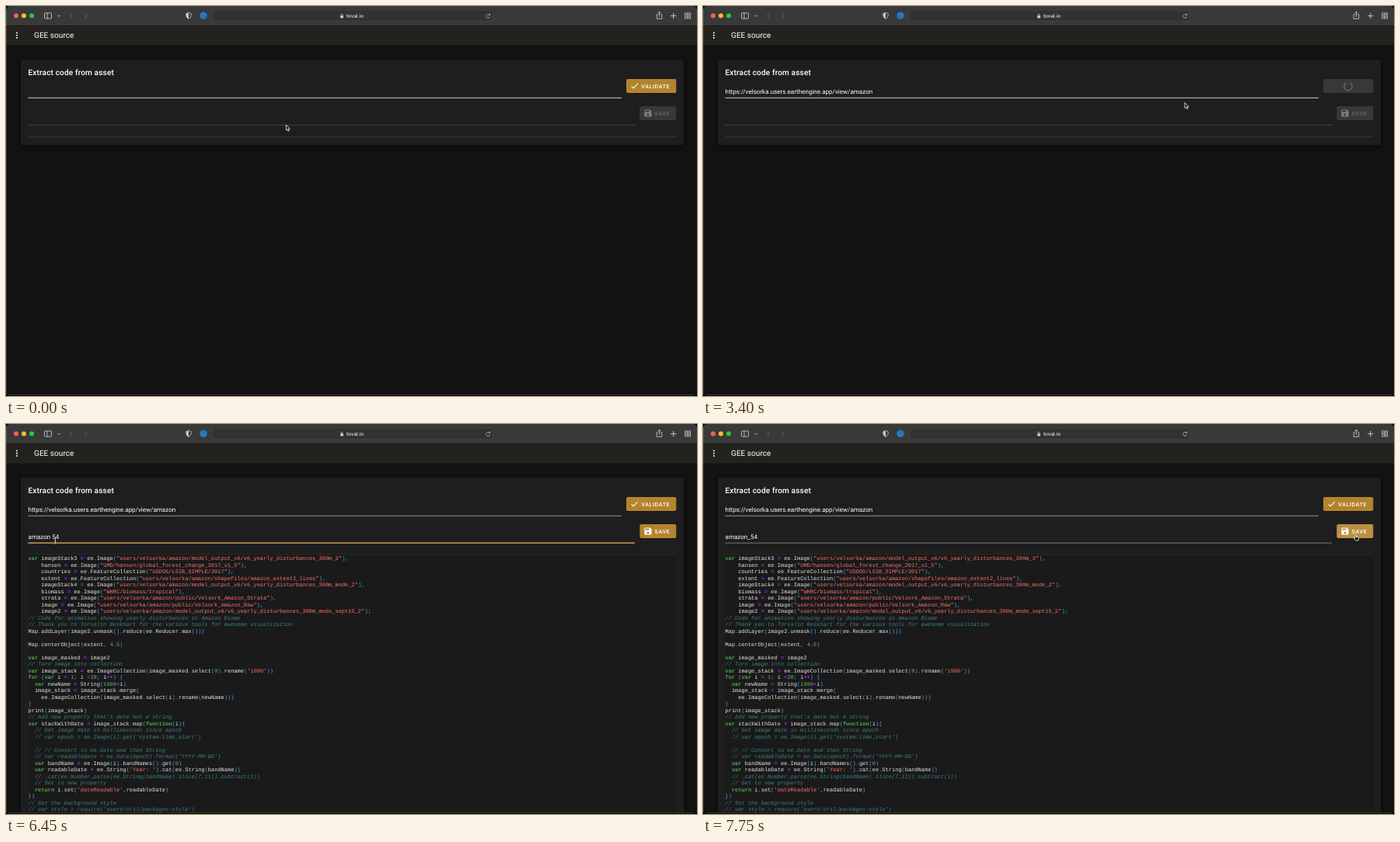
Animation of 889x502 px, one loop 8000 ms. Source, as an HTML page with a canvas:

```html
<!DOCTYPE html>
<html lang="en">
<head>
<meta charset="utf-8">
<title>GEE source</title>
<style>
html, body { margin: 0; width: 100%; height: 100%; overflow: hidden; background: #121212; }
canvas { display: block; width: 889px; height: 502px; }
</style>
</head>
<body>
<canvas id="stage"></canvas>
<script>
const W = 889, H = 502, LOOP = 8000;
const canvas = document.getElementById('stage');
const c = canvas.getContext('2d');
const dpr = window.devicePixelRatio || 1;
canvas.width = W * dpr;
canvas.height = H * dpr;

const ROBOTO = 'Roboto, sans-serif', UI = 'Inter, sans-serif';
const MONO = '"Liberation Mono", monospace';
const PRIMARY = '#b3842e', FOCUS = '#c48d3c';
const URL_TEXT = 'https://velsorka.users.earthengine.app/view/amazon';
const PAGE_URL = 'https://toval.io/api/sandbox/jupyter/voila/render/modules/GEE_source/ui.ipynb';

// Moments of the story, in ms
const T = { focus1: 600, paste: 1200, submit: 2300, loaded: 3700, focus2: 4450, type: 4950, open: 6830, close: 7220 };

const CODE = `var imageStack3 = ee.Image("users/velsorka/amazon/model_output_v6/v6_yearly_disturbances_300m_3"),
    hansen = ee.Image("UMD/hansen/global_forest_change_2017_v1_5"),
    countries = ee.FeatureCollection("USDOS/LSIB_SIMPLE/2017"),
    extent = ee.FeatureCollection("users/velsorka/amazon/shapefiles/amazon_extent2_lines"),
    imageStack4 = ee.Image("users/velsorka/amazon/model_output_v6/v6_yearly_disturbances_300m_mode_2"),
    biomass = ee.Image("WHRC/biomass/tropical"),
    strata = ee.Image("users/velsorka/amazon/public/Velsork_Amazon_Strata"),
    image = ee.Image("users/velsorka/amazon/public/Velsork_Amazon_Raw"),
    image2 = ee.Image("users/velsorka/amazon/model_output_v6/v6_yearly_disturbances_300m_mode_sept15_2");
// Code for animation showing yearly disturbances in Amazon Biome
// Thank you to Torvalin Beskhart for the various tools for awesome visualization
Map.addLayer(image2.unmask().reduce(ee.Reducer.max()))

Map.centerObject(extent, 4.5)

var image_masked = image2
// Turn image into collection
var image_stack = ee.ImageCollection(image_masked.select(0).rename('1990'))
for (var i = 1; i <28; i++) {
  var newName = String(1990+i)
  image_stack = image_stack.merge(
    ee.ImageCollection(image_masked.select(i).rename(newName)))
}
print(image_stack)
// Add new property that's date but a string
var stackWithDate = image_stack.map(function(i){
  // Get image date in milliseconds since epoch
  // var epoch = ee.Image(i).get('system:time_start')

  // // Convert to ee.Date and then String
  // var readableDate = ee.Date(epoch).format('YYYY-MM-DD')
  var bandName = ee.Image(i).bandNames().get(0)
  var readableDate = ee.String('Year: ').cat(ee.String(bandName))
  // .cat(ee.Number.parse(ee.String(bandName).slice(7,11)).subtract(1))
  // Set to new property
  return i.set('dateReadable',readableDate)
})
// Set the background style
// var style = require('users/oril/packages:style')`.split('\n');

const TOKEN = /\/\/.*|"[^"]*"|'[^']*'|\d[\d.]*|\w+|[=<+]+|[(){}.,;]+/g;

function tokenStyle(s) {
  if (s.startsWith('//')) return ['#408080', 'italic '];
  if (/^["']/.test(s)) return ['#ff7070', ''];
  if (/^(var|for|function|return)$/.test(s)) return ['#4caf50', 'bold '];
  if (/^\d/.test(s)) return ['#66bb6a', ''];
  if (/^[=<+]/.test(s)) return ['#aa22ff', 'bold '];
  if (/^\w/.test(s)) return ['#e6e6e6', ''];
  return ['#42a5f5', ''];
}

const clamp = v => Math.max(0, Math.min(1, v));
const ramp = (t, from, ms) => clamp((t - from) / ms);

function box(x, y, w, h, r, fill) {
  c.beginPath();
  c.roundRect(x, y, w, h, r);
  c.fillStyle = fill;
  c.fill();
}

function disc(x, y, r, fill) {
  c.beginPath();
  c.arc(x, y, r, 0, Math.PI * 2);
  c.fillStyle = fill;
  c.fill();
}

function path(d, x, y, scale, stroke, width, fill) {
  const p = new Path2D(d);
  c.save();
  c.translate(x, y);
  c.scale(scale, scale);
  if (fill) { c.fillStyle = fill; c.fill(p, 'evenodd'); }
  if (stroke) { c.strokeStyle = stroke; c.lineWidth = width; c.stroke(p); }
  c.restore();
}

function text(s, x, y, font, fill, align = 'left', spacing = 0) {
  c.font = font;
  c.fillStyle = fill;
  c.textAlign = align;
  c.letterSpacing = spacing + 'px';
  c.fillText(s, x, y);
  c.letterSpacing = '0px';
}

function toolbar(opened) {
  box(0, 0, W, 25, [5, 5, 0, 0], '#393939');
  box(0, 25, W, 1, 0, '#161616');
  ['#fe5f57', '#febc2e', '#28c840'].forEach((col, i) => disc(13 + i * 10, 12.5, 3, col));
  const line = (d, col = '#c4c4c4', w = 0.9) => path(d, 0, 0, 1, col, w);
  line('M50.5 9h7a1 1 0 0 1 1 1v5.2a1 1 0 0 1-1 1h-7a1 1 0 0 1-1-1v-5.2a1 1 0 0 1 1-1zM53 9v7');
  line('M66.3 11.8l1.7 1.7 1.7-1.7');
  line('M86 9.2l-3.2 3.4 3.2 3.4M101 9.2l3.2 3.4-3.2 3.4', '#686868', 1);
  path('M235 8.5l3.2 1.2v2.6q0 2.6-3.2 4.2-3.2-1.6-3.2-4.2v-2.6z', 0, 0, 1, '#c4c4c4', 0.8);
  path('M235 8.5v8q-3.2-1.6-3.2-4.2v-2.6z', 0, 0, 1, null, 0, '#c4c4c4');
  disc(254, 12.4, 4.7, '#2378c4');
  line('M838.8 10.8h-1.6v5.6h6.6v-5.6h-1.6M840.5 14v-6.6M838.6 9.2l1.9-1.9 1.9 1.9');
  line('M858.7 9v7.4M855 12.7h7.4', '#c4c4c4', 1);
  for (let i = 0; i < 4; i++) {
    c.strokeStyle = '#c4c4c4';
    c.lineWidth = 0.8;
    c.strokeRect(873.6 + (i % 2) * 4.2, 9 + (i >> 1) * 4.2, 2.8, 2.8);
  }
  box(265, 5, 362, 15, 3.5, '#4b4b4b');
  box(265.6, 5.6, 360.8, 13.8, 3, '#323232');
  if (opened) {
    c.beginPath();
    c.roundRect(265, 5.3, 362, 14.6, 3.5);
    c.strokeStyle = '#4f84b8';
    c.lineWidth = 1.6;
    c.stroke();
    disc(271.5, 12.8, 2.6, '#777');
    c.font = '400 6.35px ' + UI;
    box(276.5, 8.3, c.measureText(PAGE_URL).width + 1, 9, 0, '#3f638b');
    text(PAGE_URL, 277, 15.1, '400 6.35px ' + UI, '#f2f2f2');
  } else {
    box(430.2, 12.3, 3.8, 3.3, 0.6, '#d0d0d0');
    line('M431 12.5v-1a1.1 1.1 0 0 1 2.2 0v1', '#d0d0d0', 0.7);
    text('toval.io', 438, 15.1, '500 6.35px ' + UI, '#ededed');
  }
  line('M622.3 11.6a2.5 2.5 0 1 0 .3 2.2M622.6 9.8v2h-2', '#b8b8b8', 0.8);
}

function button(x, y, w, label, icon, state, hover) {
  const off = state !== 'on';
  if (!off) box(x - 0.3, y + 0.8, w + 0.6, 18.2, 2, 'rgba(0,0,0,.35)');
  box(x, y, w, 18, 2, off ? '#383838' : hover ? '#bc9040' : PRIMARY);
  if (state === 'busy') return;
  path(icon, x + 4.6, y + 2.9, 0.505, null, 0, off ? '#808080' : '#fff');
  text(label, x + 19.2, y + 11.6, '500 7.07px ' + ROBOTO, off ? '#6a6a6a' : '#fff', 'left', 0.63);
}

const CHECK = 'M21 7L9 19L3.5 13.5L4.91 12.09L9 16.17L19.59 5.59Z';
const FLOPPY = 'M15 9H5V5H15M12 19A3 3 0 0 1 12 13A3 3 0 0 1 12 19M17 3H5A2 2 0 0 0 3 5V19A2 2 0 0 0 5 21H19A2 2 0 0 0 21 19V7Z';

function spinner(t) {
  const turn = (t - 3400) / 700 * Math.PI * 2;
  const size = Math.PI * (1.1 + 0.6 * Math.cos(turn));
  c.beginPath();
  c.arc(830, 103.4, 5.2, turn - 1.1, turn - 1.1 + size);
  c.strokeStyle = '#808080';
  c.lineWidth = 1;
  c.stroke();
}

function underline(y, right, color, grow) {
  box(28.5, y - 0.5, right - 28.5, 0.9, 0, color);
  const half = (right - 28.5) / 2 * grow;
  if (half > 0) box(28.5 + (right - 28.5) / 2 - half, y - 0.7, half * 2, 1.3, 0, FOCUS);
}

function field(value, y, caret) {
  const font = '400 8.06px ' + ROBOTO;
  text(value, 28.5, y, font, '#fff');
  if (caret) box(28.7 + c.measureText(value).width, y - 7.3, 0.7, 9.2, 0, '#fff');
}

function code() {
  box(28.5, 167.5, 834, 340, 1, '#1a1a1a');
  box(28.5, 167.5, 834, 0.7, 0, '#2c2c2c');
  CODE.forEach((row, i) => {
    for (const m of row.matchAll(TOKEN)) {
      const [fill, style] = tokenStyle(m[0]);
      text(m[0], 28.5 + m.index * 4.205, 175.2 + i * 8.495, style + '7.01px ' + MONO, fill);
    }
  });
}

function name2(t) {
  if (t < T.loaded) return '';
  if (t < T.type) return 'amazon';
  if (t < 5450) return 'amazon ';
  if (t < 5700) return 'amazon 5';
  return t < T.open ? 'amazon 54' : 'amazon_54';
}

const blink = (t, from, ms) => Math.floor((t - from) / ms) % 2 === 0;

function caret1(t) {
  if (t < T.focus1 || t >= T.submit) return false;
  return t < T.paste ? t < 900 || t >= 1050 : blink(t, T.paste, 250);
}

function caret2(t) {
  return t >= T.focus2 && t < T.open && blink(t, t < 5700 ? T.type : 5700, 250);
}

function page(t, cur) {
  const loaded = t >= T.loaded, busy = t >= T.submit + 50 && !loaded;
  box(0, 26, W, 24, 0, '#24221f');
  box(0, 50, W, 1, 0, '#191817');
  [34.4, 37.7, 41].forEach(y => disc(14, y, 1, '#fff'));
  text('GEE source', 36, 41.2, '400 10.1px ' + ROBOTO, '#fff');

  c.save();
  c.shadowColor = 'rgba(0,0,0,.6)';
  c.shadowBlur = 4 * dpr;
  c.shadowOffsetY = dpr;
  box(19, 69, 853, loaded ? 450 : 110, 2, '#1e1e1e');
  c.restore();
  text('Extract code from asset', 28.5, 89.4, '500 10.1px ' + ROBOTO, '#fff', 'left', 0.126);

  field(t < T.paste ? '' : URL_TEXT, 112.5, caret1(t));
  underline(118.3, 792, loaded ? '#949494' : '#cfcfcf',
    ramp(t, T.focus1, 150) - ramp(t, T.submit, 150));
  button(798, 94, 64.3, 'VALIDATE', CHECK, busy ? 'busy' : 'on', cur.target === 'validate');
  if (busy) spinner(t);

  button(815.3, 129, 47, 'SAVE', FLOPPY, loaded ? 'on' : 'off', cur.target === 'save');
  if (loaded) {
    const hover = cur.x < 809 && cur.y > 128 && cur.y < 165;
    field(name2(t), 147.6, caret2(t));
    underline(153.2, 809, hover ? '#d8d8d8' : '#949494',
      ramp(t, T.focus2, 150) - ramp(t, T.open, 150));
    code();
  } else {
    c.beginPath();
    c.setLineDash([1, 1]);
    c.moveTo(28.5, 153.3);
    c.lineTo(809.5, 153.3);
    c.strokeStyle = '#757575';
    c.lineWidth = 0.9;
    c.stroke();
    c.setLineDash([]);
    box(28.5, 167.8, 834, 0.7, 0, '#3c3c3c');
  }
}

// Tiles: [label, letter or folder cells, tile colour, emblem colour]
const GREY = '#58585b', PALE = '#8f8f9c';
const TILES = [
  [59, [['DorTwist|2.0...', 'D'], ['messageri|e', ['Z', 'O', 'G']],
    ['transport', ['V', 'P', 'B', '#222', '#222', '#222', 'G']],
    ['banque', ['C', 'B', '#b05ab0', 'L']],
    ['cours', ['#5ab432', '#d8362c', 'V', 'C', '#7a35c8', 'L', 'D']],
    ['programma|tion', ['#eee', '#d9823a', '#2a5b92', 'T', 'I', 'A', 'T', 'T', 'S']]]],
  [114.5, [['montres', ['L']], ['zorbimo', ['#ddd', '#d8c49a', 'P', 'H']], ['Oriel', ['S', 'G']],
    ['fotoglim', 'F'], ['Norvia', 'N'], ['Lumdora', 'L']]],
  [205, [['T O V A L', '', '#fff', '#111'], ['Avis de|musiqu...', '', '#111', '#eee'],
    ['Lexivolo -|La...', '', '#58cc02'], ['Query|Harbo...', '', GREY, '#e8822e'],
    ['Geographi|c...', '', GREY, '#c9b28c'], ['Tableau de|bord |...', '', '#fc5a10']]],
  [260.5, [['New Script|- Terra...', 'W'], ['Wendil', 'W'], ['Clipora', 'C'],
    ['YomiKasat|o - Read...', '', '#e84b5c'], ['T O V A L', '', '#fff', '#111'],
    ['Query|Harbo...', '', GREY, '#e8822e']]]
];

function tile(x, y, [label, mark, color, emblem]) {
  const folder = Array.isArray(mark);
  box(x - 16, y, 32, 32, 4, color || (folder ? GREY : PALE));
  if (folder) {
    mark.forEach((m, i) => {
      const px = x - 12.8 + (i % 3) * 9, py = y + 3.2 + Math.floor(i / 3) * 9;
      const plain = m[0] === '#';
      box(px, py, 7.6, 7.6, 1.2, plain ? m : PALE);
      if (!plain) text(m, px + 3.8, py + 5.8, '400 5.4px ' + UI, '#fff', 'center');
    });
  } else if (emblem) {
    disc(x, y + 16, 10, emblem);
  } else {
    text(mark, x, y + 23, '400 19px ' + UI, '#fff', 'center');
  }
  const rows = label === 'Tableau de|bord |...' ? ['Tableau de', 'bord |...'] : label.split('|');
  rows.forEach((s, i) => text(s, x, y + 41.3 + i * 6.7, '500 5.5px ' + UI, '#f0f0f0', 'center'));
}

function popup(alpha) {
  if (alpha <= 0) return;
  c.save();
  c.globalAlpha = alpha;
  c.shadowColor = 'rgba(0,0,0,.6)';
  c.shadowBlur = 8 * dpr;
  box(261, 24, 370, 311, [0, 0, 5, 5], '#4a4a4a');
  c.shadowColor = 'transparent';
  box(261.7, 24, 368.6, 310.3, [0, 0, 4.5, 4.5], '#282728');
  c.clip();
  const head = (s, y) => text(s, 329.5, y, '600 10.2px ' + UI, '#f0f0f0');
  head('Favoris', 48.2);
  head('Meilleurs sites', 193.8);
  head('Partagés avec vous', 339.2);
  for (const [y, row] of TILES) row.forEach((item, i) => tile(345.3 + i * 40.1, y, item));
  c.restore();
}

// Pointer route: time, x, y
const ROUTE = [
  [0, 362, 157], [250, 362, 157], [600, 210, 110], [1450, 210, 110], [1950, 802, 106],
  [2250, 806, 107], [2400, 806, 107], [2900, 621.5, 128.5], [3750, 621.5, 128.5],
  [4400, 63.5, 147], [6350, 63.5, 150], [6450, 63.5, 150], [6780, 430, 13], [6850, 430, 13],
  [7150, 685, 157], [7220, 685, 157], [7600, 840.5, 146.5], [LOOP, 840.5, 146.5]
];

function pointer(t) {
  let i = 0;
  while (t >= ROUTE[i + 1][0]) i++;
  const [t0, x0, y0] = ROUTE[i], [t1, x1, y1] = ROUTE[i + 1];
  const u = (t - t0) / (t1 - t0), e = u * u * (3 - 2 * u);
  const x = x0 + (x1 - x0) * e, y = y0 + (y1 - y0) * e;
  const within = (l, top, r, b) => x >= l && x <= r && y >= top && y <= b;
  const loaded = t >= T.loaded;
  let target = '';
  if (within(798, 94, 862, 112) && (t < T.submit + 50 || loaded)) target = 'validate';
  else if (within(815, 129, 862, 148) && loaded) target = 'save';
  else if (within(28, 103, 792, 119) || within(265, 5, 627, 20)) target = 'text';
  else if (loaded && within(28, 137, 809, 155)) target = 'text';
  if (target === 'text' && t >= T.open && y > 24) target = '';
  const hidden = (t >= T.paste && t < 1450) || (t >= T.type && t < 6350);
  return { x, y, target, hidden };
}

function drawPointer({ x, y, target, hidden }) {
  if (hidden) return;
  c.lineJoin = 'round';
  if (target === 'text') {
    const beam = 'M-1.6-4.2Q0-4.2 0-3.2Q0-4.2 1.6-4.2M0-3.2V3.2M-1.6 4.2Q0 4.2 0 3.2Q0 4.2 1.6 4.2M-.9.9H.9';
    path(beam, x, y, 1, 'rgba(0,0,0,.6)', 1.6);
    path(beam, x, y, 1, '#eee', 0.8);
  } else if (target) {
    path('M-1.6-3.6q.6-.7 1.2 0v2.4l2.9.7q.8.3.6 1.2l-.5 2.7h-3.4l-2.2-2.6q-.3-.9.7-.7l.7.6z',
      x, y, 1, '#fff', 0.8, '#111');
  } else {
    path('M-1.6-4V2.9L.1 1.5 1.2 4 2.3 3.5 1.2 1.1H3.3Z', x, y, 1, '#fff', 0.8, '#000');
  }
  c.lineJoin = 'miter';
}

function draw(t) {
  const cur = pointer(t);
  const opened = t >= T.open && t < T.close;
  c.setTransform(dpr, 0, 0, dpr, 0, 0);
  c.textRendering = 'geometricPrecision';
  c.fillStyle = '#000';
  c.fillRect(0, 0, W, H);
  box(0, 25, W, 475, 0, '#121212');
  c.save();
  c.beginPath();
  c.rect(0, 0, W, 500);
  c.clip();
  page(t, cur);
  toolbar(opened);
  c.restore();
  popup(ramp(t, T.open, 80) - ramp(t, T.close, 120));
  box(0, 4, 0.8, 496, 0, 'rgba(255,255,255,.2)');
  box(3, 500, W - 6, 0.9, 0, '#3a3a3a');
  drawPointer(cur);
}

const start = performance.now();
function tick() {
  draw((performance.now() - start) % LOOP);
  requestAnimationFrame(tick);
}
tick();
</script>
</body>
</html>
```
